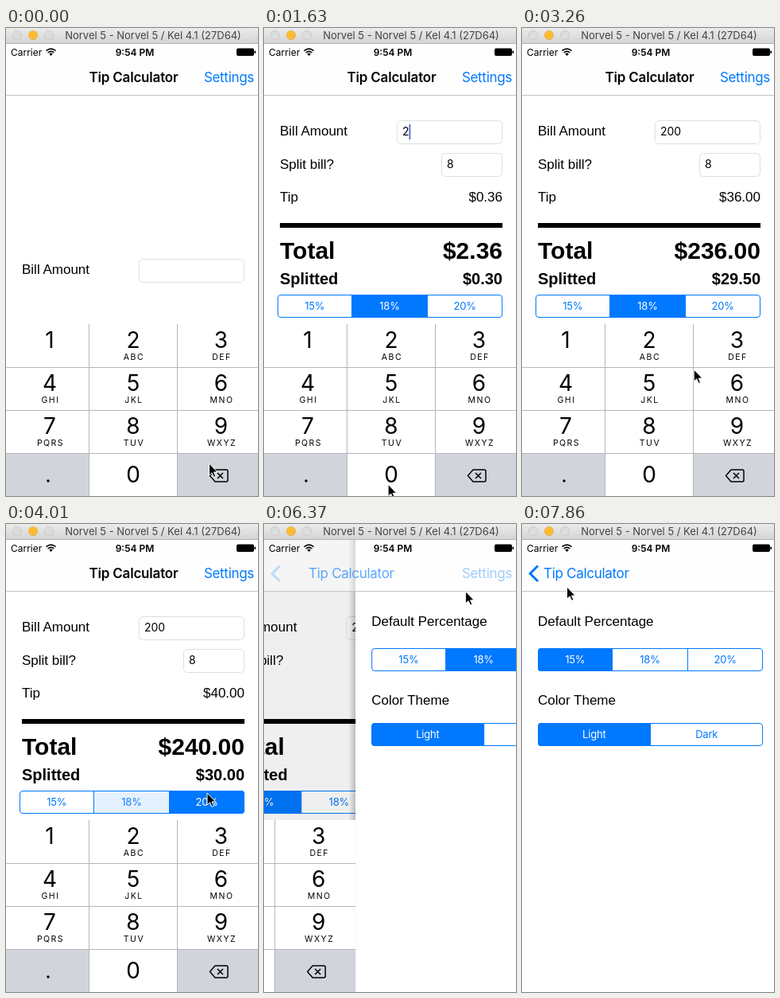
An HTML page that plays this animation: 317 px wide and 588 px high, repeating every 8000 ms.

```html
<!DOCTYPE html>
<html lang="en">
<head>
<meta charset="utf-8">
<title>Tip Calculator</title>
<style>
  html, body { margin: 0; width: 100%; height: 100%; overflow: hidden; background: #fff; }
  svg { display: block; }
  text { font-family: Inter, sans-serif; white-space: pre; }
  .label { font: 17px "Liberation Sans", Arial, sans-serif; }
  .total { font: bold 30px "Liberation Sans", Arial, sans-serif; }
  .share { font: bold 20px "Liberation Sans", Arial, sans-serif; }
  .nav { font-size: 17px; letter-spacing: -.3px; }
  .bold { font-weight: 600; }
  .nav.bold { letter-spacing: -.2px; }
  .field { font-size: 14px; letter-spacing: -.1px; }
  .seg { font-size: 13px; letter-spacing: -.2px; }
  .digit { font-size: 28px; }
  .abc { font-size: 10.5px; letter-spacing: 1.5px; }
  .status { font-size: 12px; }
  .window { font-size: 13px; fill: #444; }
</style>
</head>
<body>
<svg id="stage" width="317" height="588" viewBox="0 0 317 588"></svg>
<script>
const LOOP = 8000, STEP = LOOP / 54, BLUE = '#0078ff';
const stage = document.getElementById('stage');

// [time, value] steps
const typed = [[0, ''], [1030, '2'], [1770, '20'], [2200, '200']];
const rates = [15, 18, 20];
const rateClicks = [[0, 1], [3730, 2], [4753, 0]];
const defaultClicks = [[0, 1], [7300, 0]];
// [from, to, key]
const presses = [[880, 1030, '2'], [1770, 1920, '0'], [2200, 2365, '0']];
// [time, x, y]
const route = [
  [0, 255.5, 547], [100, 255.5, 547], [740, 158, 396], [1000, 156, 398], [1185, 140, 468],
  [1550, 156, 572], [1780, 156.5, 577], [2720, 156.5, 577], [3650, 253, 338], [4000, 253, 338],
  [4400, 165, 380], [4740, 70, 352], [5040, 70, 352], [5800, 284, 70], [6200, 284, 70],
  [6667, 183.5, 119], [7150, 72, 164], [7450, 72, 164], [7850, 56.5, 79], [8000, 56.5, 79]
];

const clamp = v => Math.max(0, Math.min(1, v));
const smooth = v => (v = clamp(v), v * v * (3 - 2 * v));
const latest = (list, t) => list.filter(e => e[0] <= t).pop()[1];
const money = v => '$' + (v + 1e-6).toFixed(2);

const text = (x, y, s, cls, anchor = 'start', fill = '', opacity = 1) =>
  `<text x="${x}" y="${y}" class="${cls}" text-anchor="${anchor}"${fill && ` fill="${fill}"`} opacity="${opacity}">${s}</text>`;
const rect = (x, y, w, h, fill, extra = '') =>
  `<rect x="${x}" y="${y}" width="${w}" height="${h}" fill="${fill}" ${extra}/>`;
const path = (d, stroke, width, extra = '') =>
  `<path d="${d}" fill="none" stroke="${stroke}" stroke-width="${width}" ${extra}/>`;
const group = (x, y, body, opacity = 1) =>
  `<g transform="translate(${x} ${y})" opacity="${opacity}">${body}</g>`;

const defs = `<defs>
  <clipPath id="pill"><rect width="283" height="29" rx="4"/></clipPath>
  <linearGradient id="chrome" x2="0" y2="1"><stop stop-color="#ebebeb"/><stop offset="1" stop-color="#d3d3d3"/></linearGradient>
  <linearGradient id="shadow"><stop stop-opacity="0"/><stop offset="1" stop-opacity=".22"/></linearGradient>
</defs>`;

// How strongly each segment is filled; a deselected one fades out.
function fills(clicks, t, n) {
  const w = Array(n).fill(0);
  clicks.forEach(([from, i], k) => {
    const end = k + 1 < clicks.length ? clicks[k + 1][0] : Infinity;
    if (t >= from) w[i] = t < end ? 1 : clamp(1 - (t - end) / 300);
  });
  return w;
}

function segments(x, y, names, weights) {
  const cuts = names.length === 3 ? [0, 93.5, 188.5, 283] : [0, 141.5, 283];
  let fill = '', over = '';
  names.forEach((s, i) => {
    const mid = (cuts[i] + cuts[i + 1]) / 2;
    fill += rect(cuts[i], 0, cuts[i + 1] - cuts[i], 29, BLUE, `opacity="${weights[i]}"`);
    if (i) over += path(`M${cuts[i]} 0V29`, BLUE, 1);
    over += text(mid, 19, s, 'seg', 'middle', BLUE) + text(mid, 19, s, 'seg', 'middle', '#fff', weights[i]);
  });
  return group(x, y, `<g clip-path="url(#pill)">${fill}</g>` +
    rect(.5, .5, 282, 28, 'none', `rx="3.5" stroke="${BLUE}"`) + over);
}

const field = (x, y, w, value) =>
  rect(x + .5, y + .5, w - 1, 29, '#fff', 'rx="5" stroke="#dedede"') + text(x + 7, y + 19, value, 'field');

function keypad(t) {
  const keys = '1 2 3 4 5 6 7 8 9 . 0 <'.split(' ');
  const letters = ' ,ABC,DEF,GHI,JKL,MNO,PQRS,TUV,WXYZ'.split(',');
  const left = [0, 104, 215, 317], mids = [55, 160, 270.5];
  let out = rect(0, 372, 317, 216, '#fff');
  keys.forEach((key, i) => {
    const c = i % 3, y = 372 + 54 * Math.floor(i / 3);
    const down = presses.some(([a, b, k]) => k === key && t >= a && t < b);
    if (down || key === '.' || key === '<')
      out += rect(left[c], y, left[c + 1] - left[c], 54, '#d1d4db');
    if (key === '.') out += '<circle cx="53" cy="569" r="1.7"/>';
    else if (key !== '<') out += text(mids[c], y + (key === '0' ? 37 : 30), key, 'digit', 'middle');
    if (letters[i]) out += text(mids[c] + 1, y + 45, letters[i], 'abc', 'middle');
  });
  return out +
    path('M0 426.5H317M0 480.5H317M0 534.5H317M104.5 372V588M215.5 372V588', '#b4b6ba', 1) +
    path('M263 555H277Q279 555 279 557V568Q279 570 277 570H263L256.5 562.5ZM266 559L273 566M273 559L266 566',
      '#000', 1.5, 'stroke-linejoin="round"');
}

function calculator(t) {
  const shown = smooth((t - 1070) / 400);
  const bill = latest(typed, t);
  const tip = bill * rates[latest(rateClicks, t)] / 100, total = +bill + tip;
  const caret = t > 1000 && t < 2800 || (t + 200) % 1000 >= 500;
  const billRow = text(20, 19, 'Bill Amount', 'label') + field(167, 0, 133, bill) +
    (caret ? rect(174 + bill.length * 8.5, 5, 1.8, 19, '#4a6cdb') : '');
  const rest = text(20, 177, 'Split bill?', 'label') + field(223, 157, 77, '8') +
    text(20, 218, 'Tip', 'label') + text(300, 218, money(tip), 'label', 'end') +
    rect(20, 245, 280, 6, '#000') +
    text(20, 290, 'Total', 'total') + text(300, 290, money(total), 'total', 'end') +
    text(20, 322, 'Splitted', 'share') + text(300, 322, money(total / 8), 'share', 'end') +
    segments(17, 335, rates.map(r => r + '%'), fills(rateClicks, t, 3));
  return rect(0, 20, 317, 568, '#fff') + group(0, 116 + 174 * (1 - shown), billRow) +
    group(0, 0, rest, shown);
}

const settings = t => rect(0, 20, 317, 568, '#fff') +
  text(20, 128.4, 'Default Percentage', 'label') +
  segments(20, 156, rates.map(r => r + '%'), fills(defaultClicks, t, 3)) +
  text(20, 227.4, 'Color Theme', 'label') + segments(20, 250, ['Light', 'Dark'], [1, 0]);

function bars(t, k) {
  const lights = ['#dcdcdc', '#fdbc2f', '#dcdcdc'].map((c, i) =>
    `<circle cx="${14 + 20 * i}" cy="9" r="5.8" fill="${c}" stroke="#000" stroke-opacity=".08"/>`).join('');
  const nav = rect(0, 20, 317, 64, '#fdfdfd', 'opacity=".4"') + path('M0 84.5H317', '#c4c4c4', 1) +
    text(160.5 - 80 * k, 68, 'Tip Calculator', 'nav bold', 'middle', '', clamp(1 - 2 * k)) +
    text(312, 68, 'Settings', 'nav', 'end', BLUE, 1 - k) +
    text(27 + 80 * (1 - k), 68, 'Tip Calculator', 'nav', 'start', BLUE, k) +
    path('M20 52.5L10.2 62.3L20 72', BLUE, 3, `opacity="${clamp((t - 6190) / 800)}"`);
  const status = text(6, 34.5, 'Carrier', 'status') + text(162, 34.5, '9:54 PM', 'status bold', 'middle') +
    path('M50.5 28.7Q56.5 23.4 62.5 28.7M52.6 31Q56.5 27.6 60.4 31', '#000', 1.6) +
    '<path d="M54.2 32.4Q56.5 30.6 58.8 32.4L56.5 35Z"/>' +
    rect(290, 25.5, 22, 9.5, '#000', 'rx="2"') + rect(312.5, 28.5, 1.6, 3.5, '#000', 'rx=".8"');
  const chrome = rect(0, 0, 317, 20, 'url(#chrome)') + path('M0 19.5H317', '#b3b3b3', 1) + lights +
    text(185, 14, 'Norvel 5 - Norvel 5 / Kel 4.1 (27D64)', 'window', 'middle');
  return nav + status + chrome;
}

function cursor(t) {
  const i = route.findIndex(p => p[0] > t), [t0, x0, y0] = route[i - 1], [t1, x1, y1] = route[i];
  const p = smooth((t - t0) / (t1 - t0));
  return group(x0 + (x1 - x0) * p, y0 + (y1 - y0) * p,
    '<path d="M0 0V15L3.5 11.8L6 17.3L8.3 16.3L6 11H10.6Z" stroke="#fff"/>');
}

function draw(t) {
  // Critically damped push: the page slides in, the keypad slides out with it
  const s = Math.max(0, t - 6190) * .012;
  const gap = 317 * (1 + s) * Math.exp(-s), k = 1 - gap / 317;
  let out = defs;
  if (gap > .3) out += group(-100 * k, 0, calculator(t));
  if (k > 0) out += rect(0, 20, 317, 568, '#000', `opacity="${.1 * k}"`) +
    group(gap, 0, rect(-9, 20, 9, 568, 'url(#shadow)') + settings(t));
  if (gap > .3) out += group(gap - 317, 0, keypad(t));
  stage.innerHTML = out + bars(t, k) + cursor(t);
}

const start = performance.now();
let last = -1;
function tick() {
  const n = Math.floor(((performance.now() - start) % LOOP + 12) / STEP) % 54;
  if (n !== last) draw((last = n) * STEP);
  requestAnimationFrame(tick);
}
tick();
</script>
</body>
</html>
```
